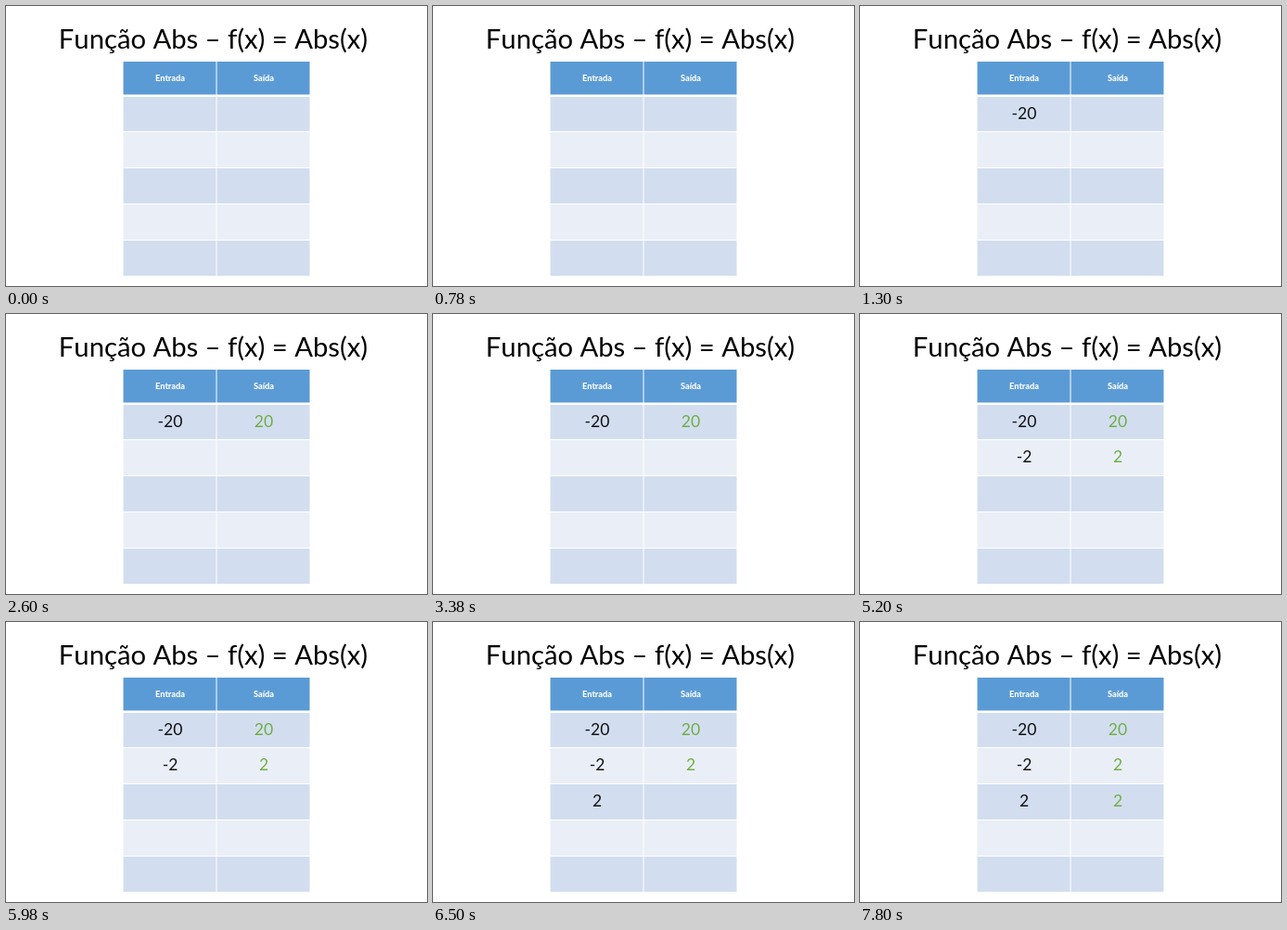
Recreate the animation shown at these times as an HTML page. Size 454x302 px, loop 8 s.

```html
<!DOCTYPE html>
<html lang="pt">
<head>
<meta charset="utf-8">
<title>Função Abs</title>
<style>
  html, body { margin: 0; width: 100%; height: 100%; overflow: hidden; background: #fff; }
  svg { display: block; width: 100%; height: 100%; font-family: Lato, "Open Sans", sans-serif; text-anchor: middle; }
  .title { font-size: 29.2px; font-kerning: none; }
  .head { font-size: 9.2px; font-weight: 800; fill: #fff; }
  .value { font-size: 17.5px; }
</style>
</head>
<body>
<svg id="stage" viewBox="0 0 454 302"></svg>
<script>
const stage = document.getElementById("stage");
const LOOP = 8000, STEP = 1300;
const columns = [{ x: 126.5, mid: 177 }, { x: 227.5, mid: 278 }];
const rowTops = [98, 136, 175, 214, 253];
const inputs = [-20, -2, 2];

function add(tag, attributes, content = "") {
  const node = document.createElementNS("http://www.w3.org/2000/svg", tag);
  for (const key in attributes) node.setAttribute(key, attributes[key]);
  node.textContent = content;
  return stage.appendChild(node);
}

const addCell = (x, y, height, fill) => add("rect", { x, y, width: 100, height, fill });
const addText = (x, y, name, content, fill) =>
  add("text", { x, y, class: name, ...(fill && { fill }) }, content);

addText(223.5, 46, "title", "Função Abs – f(x) = Abs(x)", "#000");

columns.forEach(({ x, mid }, i) => {
  addCell(x, 60, 35.5, "#5b9bd5");
  rowTops.forEach((y, row) => addCell(x, y, row ? 38 : 37, row % 2 ? "#eaeff7" : "#d2deef"));
  addText(mid, 81, "head", ["Entrada", "Saída"][i]);
});

// Values in order of appearance: each input, then its absolute value.
const values = inputs.flatMap((n, row) => {
  const y = 122 + Math.floor(row * 38.5);
  return [
    addText(columns[0].mid, y, "value", n, "#111"),
    addText(columns[1].mid, y, "value", Math.abs(n), "#70ad47")
  ];
});

function draw() {
  const time = performance.now() % LOOP;
  values.forEach((node, i) => {
    node.style.visibility = time >= (i + 1) * STEP ? "visible" : "hidden";
  });
  requestAnimationFrame(draw);
}
draw();
</script>
</body>
</html>
```
